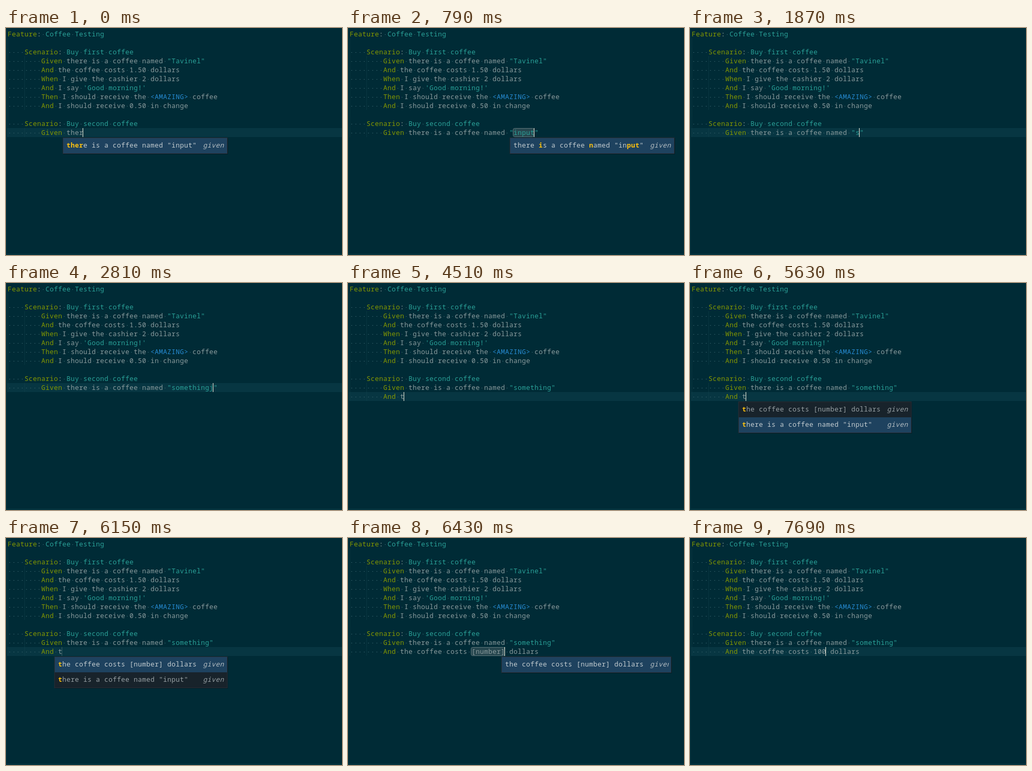
An HTML page with a canvas that plays this animation: 640 by 431 pixels, repeating every 8000 ms.

```html
<!DOCTYPE html>
<html lang="en">
<head>
<meta charset="utf-8">
<title>Step completion</title>
<style>
html, body { margin: 0; width: 640px; height: 431px; overflow: hidden; background: #002b36; }
canvas { display: block; }
</style>
</head>
<body>
<canvas id="stage" width="640" height="431"></canvas>
<script>
const ctx = document.getElementById('stage').getContext('2d');
const LOOP = 8000, NEWLINE = 3510, CELL = 8, ROW = 17, LEFT = 3, TOP = 3;
const FONT = '12.7px "Noto Sans Mono", "DejaVu Sans Mono", monospace';
const TAB = '        ';
const GREY = '#8a9b9d', GREEN = '#859900', TEAL = '#2aa198', BLUE = '#268bd2';

const head = [
  'Feature: Coffee Testing',
  '',
  '    Scenario: Buy first coffee',
  TAB + 'Given there is a coffee named "Tavinel"',
  TAB + 'And the coffee costs 1.50 dollars',
  TAB + 'When I give the cashier 2 dollars',
  TAB + "And I say 'Good morning!'",
  TAB + 'Then I should receive the <AMAZING> coffee',
  TAB + 'And I should receive 0.50 in change',
  '',
  '    Scenario: Buy second coffee'
];
const named = s => `Given there is a coffee named "${s}|"`;
const costs = s => `And the coffee costs ${s}| dollars`;

// The line being edited; | marks the caret.
const typing = [
  [0, 'Given ther|'],
  [790, named('input')],
  [1870, named('s')],
  [1990, named('som')],
  [2130, named('somet')],
  [2260, named('someth')],
  [2400, named('somethin')],
  [2530, named('something')],
  [2810, named('somethingj')],
  [2930, named('something')],
  [3080, named('somethin')],
  [3210, named('something')],
  [NEWLINE, '|'],
  [4090, 'A|'],
  [4240, 'An|'],
  [4390, 'And |'],
  [4510, 'And t|'],
  [6430, costs('[number]')],
  [7410, costs('1')],
  [7530, costs('10')],
  [7690, costs('100')]
];

const caretAlpha = [
  [0, 1], [120, .7], [240, .3], [360, 0], [790, 1], [1230, .5], [1350, 0],
  [1870, 1], [3940, .5], [4090, 1], [4930, .7], [5055, .3], [5180, 0],
  [5630, 1], [6030, .6], [6150, .2], [6430, 1], [6860, .5], [7010, 0], [7410, 1]
];

// Asterisks surround the matched letters.
const pair = chosen => ({
  x: 93, y: 226, w: 328, chosen,
  items: ['*t*he coffee costs [number] dollars', '*t*here is a coffee named "input"']
});
const popups = [
  [0, { x: 109, y: 209, w: 312, chosen: 0, items: ['*ther*e is a coffee named "input"'] }],
  [790, { x: 309, y: 209, w: 312, chosen: 0, items: ['there *i*s a coffee *n*amed "in*put*"'] }],
  [1870, null],
  [4630, pair(0)],
  [5480, pair(1)],
  [6150, pair(0)],
  [6430, { x: 293, y: 226, w: 322, chosen: 0, items: ['the coffee costs [number] dollars'] }],
  [7410, null]
];

const at = (track, t) => track.findLast(step => step[0] <= t)[1];
const rowY = row => TOP + row * ROW;

function rect(x, y, w, h, color) {
  ctx.fillStyle = color;
  ctx.fillRect(x, y, w, h);
}

// Letters sit in the middle of fixed cells.
function letters(text, x, y, color, style = '') {
  ctx.font = style + ' ' + FONT;
  ctx.fillStyle = color;
  [...text].forEach((c, i) => ctx.fillText(c, x + (i + .5) * CELL, y));
}

const token = /(?<=: ).+|(["']).*?\1|<.*?>|\b(?:Feature|Scenario|Given|And|When|Then)\b|./g;

function tokenColor(m) {
  if (/^["']./.test(m[0]) || m.input.slice(0, m.index).endsWith(': ')) return TEAL;
  if (m[0].length === 1) return GREY;
  return m[0][0] === '<' ? BLUE : GREEN;
}

function codeLine(text, row) {
  const y = rowY(row);
  for (const m of text.matchAll(token))
    letters(m[0], LEFT + m.index * CELL, y + 13, tokenColor(m));
  [...text].forEach((c, i) => {
    if (c === ' ') rect(LEFT + i * CELL + 3, y + 9, 2, 1, '#2b5761');
  });
}

function guide(x, from, to) {
  for (let y = rowY(from); y < rowY(to); y += 2) rect(x, y, 1, 1, '#12414b');
}

function fieldBox(col, length, row) {
  ctx.beginPath();
  ctx.roundRect(LEFT + col * CELL - .5, rowY(row) + .5, length * CELL, 16, 3);
  ctx.fillStyle = '#27474f';
  ctx.fill();
  ctx.strokeStyle = '#5c757a';
  ctx.lineWidth = 1;
  ctx.stroke();
}

function drawPopup({ x, y, w, chosen, items }) {
  const h = 29 * items.length;
  rect(x, y, w + 2, h + 2, 'rgba(0,0,0,.25)');
  rect(x - 1, y - 1, w + 2, h + 2, '#2a2c34');
  items.forEach((item, i) => {
    const top = y + 29 * i, active = i === chosen;
    const color = active ? '#c3ccd0' : '#98a1a5';
    rect(x, top, w, 29, active ? '#1e425f' : '#18232b');
    ctx.save();
    ctx.beginPath();
    ctx.rect(x, top, w - 4, 29);
    ctx.clip();
    let cx = x + 6;
    item.split('*').forEach((part, k) => {
      letters(part, cx, top + 18, k % 2 ? '#ffc20e' : color, k % 2 ? 'bold' : '');
      cx += part.length * CELL;
    });
    const tagX = x + (items.length > 1 || w === 322 ? 282 : 266);
    letters('given', tagX, top + 18, active ? '#b3bdc2' : '#98a1a5', 'italic');
    ctx.restore();
  });
}

function draw(now) {
  const t = now % LOOP;
  const row = t < NEWLINE ? 11 : 12;
  const marked = TAB + at(typing, t);
  const caret = marked.indexOf('|');
  const line = marked.replace('|', '');
  const field = line.match(/input|\[number\]/);
  const popup = at(popups, t);

  ctx.textAlign = 'center';
  rect(0, 0, 640, 431, '#002b36');
  rect(0, 0, 1, 431, '#04323d');
  rect(0, 428, 640, 3, '#04323d');
  if (field) fieldBox(field.index, field[0].length, row);
  else rect(2, rowY(row), 638, ROW, '#073642');

  guide(LEFT, 1, row + 1);
  guide(LEFT + 4 * CELL, 3, 9);
  guide(LEFT + 4 * CELL, 11, row + 1);
  head.forEach(codeLine);
  if (row === 12) codeLine(TAB + named('something').replace('|', ''), 11);
  codeLine(line, row);

  ctx.globalAlpha = at(caretAlpha, t);
  rect(LEFT + caret * CELL - 1, rowY(row), 1, ROW, '#fdf6e3');
  ctx.globalAlpha = 1;
  if (popup) drawPopup(popup);
  requestAnimationFrame(draw);
}
requestAnimationFrame(draw);
</script>
</body>
</html>
```
